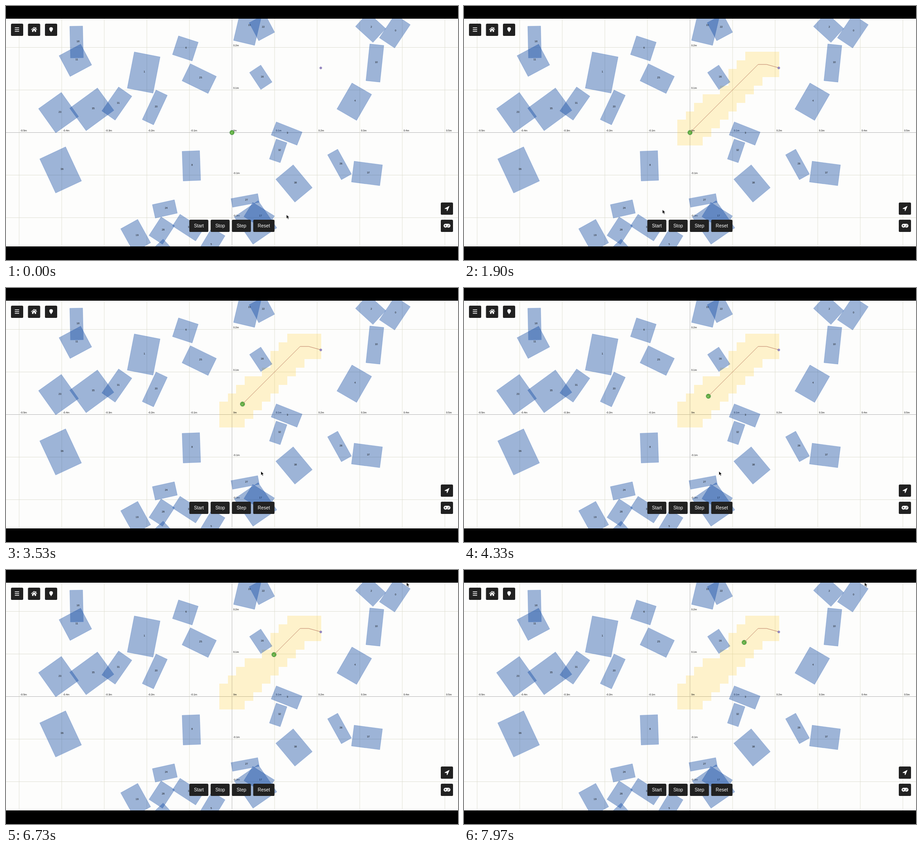
Recreate the animation shown at these times as an HTML page. Size 998 by 561 pixels, loop 8 s.

```html
<!DOCTYPE html>
<html lang="en">
<head>
<meta charset="utf-8">
<title>Path planner</title>
<style>
  html, body { margin: 0; width: 100%; height: 100%; overflow: hidden; background: #000; }
  svg { display: block; width: 100vw; height: 100vh; font-family: "Liberation Sans", Arial, sans-serif; }
  .grid { stroke: #dbdbcd; stroke-width: .8; }
  .axis { stroke: #b9b9b9; stroke-width: 1; }
  .box { fill: #0d47a1; fill-opacity: .4; stroke: #1f58b4; stroke-opacity: .4; stroke-width: .6; }
  .small { font-size: 5.6px; fill: #111; }
  .btn { fill: #212121; }
  .caption { font-size: 10.3px; fill: #fff; text-anchor: middle; }
  .icon { fill: #fff; }
  #cells { fill: #ffca28; fill-opacity: .23; shape-rendering: crispEdges; }
  #route { fill: none; stroke: #b9785f; stroke-width: .9; stroke-dasharray: 300 300; }

  #plan, #route, #robot, #cursor { animation: 8s linear infinite; }
  #plan { animation-name: reveal; animation-timing-function: step-end; }
  #route { animation-name: consume; }
  #robot { animation-name: drive; }
  #cursor { animation-name: point; }

  @keyframes reveal { 0% { visibility: hidden; } 15%, 100% { visibility: visible; } }
  @keyframes consume { 0%, 30.8% { stroke-dashoffset: 0; } 100% { stroke-dashoffset: -170; } }
  @keyframes drive {
    0%, 30.8% { transform: translate(499px, 279.5px); }
    100% { transform: translate(619.2px, 159.3px); }
  }
  @keyframes point {
    0% { transform: translate(619.5px, 461px); }
    11.25%, 18.75% { transform: translate(428px, 485px); }
    23.75% { transform: translate(438px, 450px); }
    30%, 62.5% { transform: translate(563px, 405px); }
    68.375% { transform: translate(788px, 127px); }
    73%, 100% { transform: translate(884.5px, 27.5px); }
  }
</style>
</head>
<body>
<svg viewBox="0 0 998 561" preserveAspectRatio="none">
  <clipPath id="view"><rect y="28" width="998" height="503"/></clipPath>
  <rect width="998" height="561"/>
  <g clip-path="url(#view)">
    <rect y="28" width="998" height="503" fill="#fdfdfc"/>
    <g id="grid"></g>
    <g id="plan"><path id="cells"/></g>
    <g id="robot">
      <circle r="4.8" fill="#5bb03c" stroke="#357f35" stroke-width="1"/>
      <path d="M-2.8 2.8L2.8-2.8M-3 -1.5L1.5 3" stroke="#a9d58c" stroke-width=".9"/>
    </g>
    <g id="labels"></g>
    <g id="boxes"></g>
    <g id="plan" style="animation-name:reveal">
      <path id="route" d="M499 279.5L649.4 129.1H668.2L695 136.5"/>
    </g>
    <circle cx="695" cy="136.8" r="2.4" fill="#9a8bc9" stroke="#75689f" stroke-width=".7"/>
  </g>
  <g id="buttons"></g>
  <g class="icon">
    <path d="M19.5 47.5h9.5v1.5h-9.5zM19.5 51.5h9.5v1.5h-9.5zM19.5 55.3h9.5v1.5h-9.5z"/>
    <path d="M62 46.3l6.7 5.8-.8.9-5.9-5.1-5.9 5.1-.8-.9zM65 47h1.6v3.3l-1.6-1.4zM62 49.2l4.4 3.8v4.2h-3.1v-3h-2.6v3h-3.1V53z"/>
    <path fill-rule="evenodd" d="M99.6 58C98 55.6 95.6 53 95.6 50.8a4 4 0 0 1 8 0C103.600 53 101.200 55.600 99.600 58z"/>
    <path d="M979 442.300l-4.300 10.200c-.4.8-1.400.6-1.400-.4v-3.800h-3.800c-1 0-1.200-1.100-.4-1.500l9-4.900c.6-.3 1.100-.1.900.4z"/>
    <path d="M970.500 481h6.500a4.300 4.300 0 0 1 0 8.600c-1.200 0-1.700-.5-2.400-1.200h-1.700c-.7.7-1.200 1.200-2.400 1.200a4.300 4.300 0 0 1 0-8.600z"/>
    <path d="M968.400 485.200h3.800M970.300 483.300v3.800" stroke="#212121" stroke-width="1.100"/>
    <g fill="#212121"><circle cx="976" cy="486.500" r=".9"/><circle cx="977.800" cy="484.200" r=".9"/></g>
  </g>
  <g id="cursor">
    <path d="M0 0V8.400L2 6.600 3.500 10 5 9.300 3.500 6.100H6.200z" stroke="#fff" stroke-width=".5"/>
  </g>
</svg>
<script>
const $ = id => document.getElementById(id);
const ORIGIN = { x: 499, y: 279.5 }, TENTH = 94, CELL = 18.8;

function add(parent, tag, attrs, text) {
  const el = document.createElementNS('http://www.w3.org/2000/svg', tag);
  for (const key in attrs) el.setAttribute(key, attrs[key]);
  if (text !== undefined) el.textContent = text;
  parent.append(el);
  return el;
}

// Grid and its metre labels
const label = (x, y, text) => add($('labels'), 'text', { x, y, class: 'small' }, text);
const metres = n => (n ? (n / 10).toFixed(1) : '0') + 'm';
for (let n = -5; n <= 5; n++) {
  const x = ORIGIN.x + n * TENTH, y = ORIGIN.y - n * TENTH;
  const style = n ? 'grid' : 'axis';
  add($('grid'), 'path', { class: style, d: `M${x} 28V531` });
  label(x + 2.7, 277, metres(n));
  if (Math.abs(n) > 2) continue;
  add($('grid'), 'path', { class: style, d: `M0 ${y}H998` });
  if (n) label(x - n * TENTH + 2.7, y - 2.6, metres(n));
}

// Corridor: each step of the route widened by one cell, minus blocked cells
const corridor = new Set();
for (let step = 0; step <= 9; step++)
  for (let i = -1; i <= 1; i++)
    for (let j = -1; j <= 1; j++) corridor.add(`${step + i},${Math.min(step, 8) + j}`);
['3,5', '4,6'].forEach(cell => corridor.delete(cell));
$('cells').setAttribute('d', [...corridor].map(cell => {
  const [i, j] = cell.split(',');
  return `M${ORIGIN.x + (i - .5) * CELL} ${ORIGIN.y - (+j + .5) * CELL}h${CELL}v${CELL}h${-CELL}z`;
}).join(''));

// Obstacles: the label starts at the centre
function box(id, cx, cy, w, h, angle) {
  add($('boxes'), 'rect', {
    class: 'box', x: cx - w / 2, y: cy - h / 2, width: w, height: h,
    transform: `rotate(${angle} ${cx} ${cy})`
  });
  add($('boxes'), 'text', { x: cx, y: cy, class: 'small' }, id);
}
box(0, 858.5, 55.8, 40.6, 62, 33.8);
box(1, 304, 147, 58, 81.5, 11);
box(2, 805, 47.5, 52.4, 41.7, 42.5);
box(3, 619.7, 281.7, 61.3, 31.2, 21.5);
box(4, 769, 211.4, 50.2, 66.4, 30);
box(5, 451.5, 528, 34, 68, 31);
box(6, 396, 93.7, 45.7, 43.5, 18);
box(8, 409.3, 353, 38.7, 65.6, -2);
box(10, 814.5, 126, 31.2, 81.5, 6);
box(11, 153.2, 120, 54, 52, -28);
box(15, 534.5, 44, 47.8, 77, 13.3);
box(16, 562.6, 157.5, 29.8, 45.2, -33.5);
box(17, 559, 464.5, 56.6, 37, 32);
box(18, 155.8, 79.5, 28.5, 70, -1.3);
box(19, 286.3, 507.5, 43, 59, -29);
box(20, 328.5, 224, 27.5, 72, 25);
box(22, 565, 47.5, 39.8, 45, -28);
box(23, 116, 235.5, 61.9, 65.5, -35.5);
box(24, 350.7, 448.2, 49.8, 30.3, -12.5);
box(25, 426.6, 160.3, 64, 42, 26);
box(26, 736.4, 350, 25.5, 62.8, -29);
box(27, 528, 429.5, 60, 19.5, -10.5);
box(28, 344, 496, 35.6, 49, 33);
box(31, 244.8, 215.5, 35.8, 64.5, 35);
box(32, 601, 320, 25.2, 46.5, 18.8);
box(33, 401.5, 489.5, 61, 30.8, 33);
box(34, 346, 543, 40, 40, -43);
box(35, 189.4, 228.2, 76, 61.5, -36.2);
box(36, 120.6, 362.1, 63, 83.2, -25);
box(37, 797, 369.8, 63, 46.3, 7.4);
box(38, 636, 392, 50, 65.8, -39.8);
box(40, 551, 478, 63.8, 73, -34.5);

// Controls
function button(x, y, width, text) {
  add($('buttons'), 'rect', { class: 'btn', x, y, width, height: 27, rx: 2.6 });
  if (text) add($('buttons'), 'text', { class: 'caption', x: x + width / 2, y: y + 17 }, text);
}
[11, 48.5, 86].forEach(x => button(x, 39, 27));
[434, 472].forEach(y => button(960, y, 27));
['Start', 'Stop', 'Step', 'Reset'].forEach((text, i) =>
  button(404.8 + 47 * i, 472, i < 3 ? 42 : 47, text));
</script>
</body>
</html>
```
